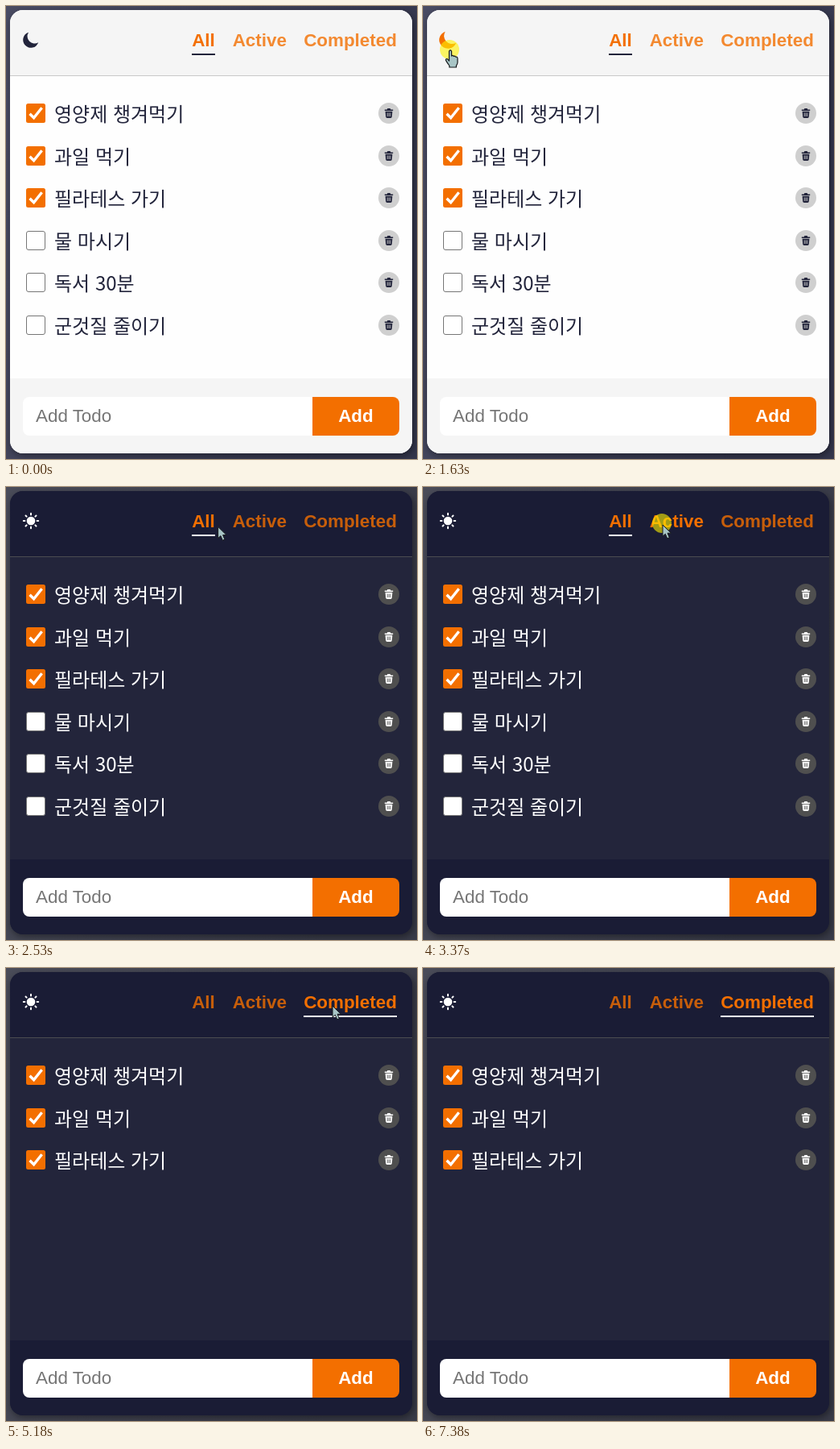
An HTML page for the animation above (7.66 s loop, 511 by 562 pixels).

```html
<!DOCTYPE html>
<html lang="ko">
<head>
<meta charset="utf-8">
<title>Todo</title>
<style>
  html, body { margin: 0; width: 100%; height: 100%; overflow: hidden; }
  svg {
    display: block; width: 511px; height: 562px;
    --page1: #4a4c63; --page2: #34364c; --bar: #f5f5f5; --main: #fefefe;
    --text: #22243b; --line: #c9c9c9; --mark: #22243b; --accent: #f36f00;
  }
  svg.dark {
    --page1: #4a4c59; --page2: #383a47; --bar: #1a1c35; --main: #23253b;
    --text: #fff; --line: #4b4c51; --mark: #fff;
  }
  .bar { fill: var(--bar); }
  .tab, .btn { font: bold 22.4px "Liberation Sans", Arial, sans-serif; }
  .tab { fill: var(--accent); }
  .btn { fill: #fff; }
  .hint { font: 22.4px "Liberation Sans", Arial, sans-serif; fill: #757575; }
  .todo { font: 24px "Noto Sans CJK KR", "Noto Sans CJK", "Noto Sans KR", sans-serif; fill: var(--text); }
  .bin { fill: var(--text); }
</style>
</head>
<body>
<svg id="stage" viewBox="0 0 511 562">
  <defs>
    <linearGradient id="page" x2="1" y2=".35">
      <stop offset="0" style="stop-color:var(--page1)"/>
      <stop offset="1" style="stop-color:var(--page2)"/>
    </linearGradient>
    <filter id="blur" x="-10%" y="-10%" width="120%" height="120%"><feGaussianBlur stdDeviation="4"/></filter>
    <clipPath id="card"><rect x="5" y="5" width="500" height="550" rx="16"/></clipPath>
    <clipPath id="field"><rect x="21" y="485" width="468" height="48" rx="8"/></clipPath>
  </defs>
  <rect width="511" height="562" fill="url(#page)"/>
  <rect x="6" y="8" width="501" height="550" rx="16" opacity=".4" filter="url(#blur)"/>
  <g clip-path="url(#card)">
    <rect x="5" y="5" width="500" height="550" style="fill:var(--main)"/>
    <rect class="bar" x="5" y="5" width="500" height="81"/>
    <rect x="5" y="86" width="500" height="1" style="fill:var(--line)"/>
    <rect class="bar" x="5" y="462" width="500" height="93"/>
  </g>
  <g id="theme">
    <path id="moon" d="M-3-9.3A9.8 9.8 0 1 0 9.2 3.3A9 9 0 0 1-3-9.3Z"/>
    <g id="sun"><circle r="5.3"/></g>
  </g>
  <g id="tabs"></g>
  <rect id="underline" y="59" height="2" style="fill:var(--mark)"/>
  <g id="list"></g>
  <g clip-path="url(#field)">
    <rect x="21" y="485" width="360" height="48" fill="#fff"/>
    <rect x="381" y="485" width="108" height="48" style="fill:var(--accent)"/>
  </g>
  <text class="hint" x="37" y="516">Add Todo</text>
  <text class="btn" x="413.2" y="516">Add</text>
  <g id="cursor">
    <circle id="press" r="12" fill="#fff200" opacity=".6"/>
    <g fill="#a8c5c6" stroke="#17191c" stroke-linejoin="round">
      <path id="arrow" d="M1 2V16.2L4.3 13.2L6.7 18.8L9.3 17.7L7 12.2H11.4Z"/>
      <path id="hand" stroke-width="1.2" d="M-.5 2Q1-.2 2.5 2V8Q4 6.6 5.2 8.4Q6.6 7.4 7.6 9.2Q9.6 8.6 10 11V16Q9.8 18.4 8.4 20V22H-.2V20Q-2.6 17-4.6 13.4Q-5 11.2-2.8 11.6L-.5 14Z"/>
    </g>
  </g>
</svg>
<script>
const LOOP = 7660;
const $ = id => document.getElementById(id);
const make = (parent, tag, attrs, text) => {
  const node = document.createElementNS('http://www.w3.org/2000/svg', tag);
  for (const key in attrs) node.setAttribute(key, attrs[key]);
  if (text) node.textContent = text;
  return parent.appendChild(node);
};
const show = (node, on) => node.setAttribute('display', on ? 'inline' : 'none');

for (let i = 0; i < 8; i++) {
  make($('sun'), 'path', {
    d: 'M0-7.6V-9.2', fill: 'none', 'stroke-width': 2, 'stroke-linecap': 'round', transform: `rotate(${i * 45})`
  });
}

const tabs = [['All', 231.2, 260], ['Active', 281.7, 349], ['Completed', 370.2, 486]]
  .map(([name, x, end]) => ({ x, end, node: make($('tabs'), 'text', { class: 'tab', x, y: 50 }, name) }));

const todos = ['영양제 챙겨먹기', '과일 먹기', '필라테스 가기', '물 마시기', '독서 30분', '군것질 줄이기']
  .map((name, i) => {
    const done = i < 3;
    const node = make($('list'), 'g', {});
    if (done) {
      make(node, 'rect', { x: 25, y: -12, width: 24, height: 24, rx: 2.5, style: 'fill:var(--accent)' });
      make(node, 'path', { d: 'M29.5 .8L34.6 5.8L44.6-6.8', fill: 'none', stroke: '#fff', 'stroke-width': 3.4 });
    } else {
      make(node, 'rect', { x: 25.5, y: -11.5, width: 23, height: 23, rx: 2.5, fill: '#fff', stroke: '#767676' });
    }
    make(node, 'text', { class: 'todo', x: 60, y: 10 }, name);
    const disc = make(node, 'circle', { cx: 476, r: 13 });
    make(node, 'path', {
      class: 'bin',
      d: 'M470.8-4.6H473.6L474.4-6H477.6L478.4-4.6H481.2V-3H470.8ZM471.6-2.2H480.4L479.8 4.6Q479.6 6 478.2 6H473.8Q472.4 6 472.2 4.6Z'
    });
    const slits = make(node, 'path', { d: 'M474.2-.5V4M476-.5V4M477.8-.5V4', 'stroke-width': .8 });
    return { done, node, disc, slits };
  });

const smooth = p => p * p * (3 - 2 * p);
const smoother = p => p * p * p * (p * (6 * p - 15) + 10);
const easeIn = p => p ** 3;
const easeOut = p => 1 - (1 - p) ** 3;

// start, step length, steps, from, to, easing
const moves = [
  [200, 70, 11, [497, 566], [39, 58], smooth],
  [970, 70, 3, [39, 58], [33, 54], easeOut],
  [1900, 70, 8, [33, 54], [181, 53], easeIn],
  [2460, 70, 6, [181, 53], [297, 45], easeOut],
  [4100, 68, 6, [297, 45], [405, 45], smoother],
  [6710, 67, 11, [405, 45], [492, 600], smooth]
];
const clicks = [[1630, 1760], [3370, 3500], [5040, 5180]];

function pointer(t) {
  const move = moves.filter(m => m[0] <= t).pop();
  if (!move) return [-99, 600];
  const [start, step, n, from, to, ease] = move;
  const p = ease(Math.min(n, Math.floor((t - start) / step) + 1) / n);
  return from.map((v, i) => v + (to[i] - v) * p);
}

function draw(t) {
  const dark = t >= 1760;
  const tab = t < 3500 ? 0 : t < 5180 ? 1 : 2;
  const [x, y] = pointer(t);
  const onTheme = x > 15 && x < 38 && y < 58;

  $('stage').setAttribute('class', dark ? 'dark' : '');
  show($('moon'), !dark);
  show($('sun'), dark);
  const tint = onTheme ? 'var(--accent)' : 'var(--text)';
  $('theme').style.fill = $('theme').style.stroke = tint;
  $('moon').style.stroke = 'none';
  $('sun').firstElementChild.style.stroke = 'none';
  $('theme').setAttribute('transform', `translate(31 42) scale(${onTheme ? 1.1 : 1})`);

  tabs.forEach((item, i) => {
    const over = x >= item.x && x <= item.end && y > 30 && y < 62;
    item.node.setAttribute('opacity', i === tab || over ? 1 : .8);
  });
  const left = Math.round(tabs[tab].x);
  $('underline').setAttribute('x', left);
  $('underline').setAttribute('width', tabs[tab].end - left);

  // the bin discs fade between themes in a few steps
  const fade = !dark ? 0 : t < 1840 ? .5 : t < 1910 ? .85 : 1;
  const grey = Math.round(207 - 128 * fade);
  const shade = `rgb(${grey},${grey},${grey})`;
  let row = 0;
  todos.forEach(({ done, node, disc, slits }) => {
    const on = tab === 0 || done === (tab === 2);
    show(node, on);
    if (!on) return;
    node.setAttribute('transform', `translate(0 ${Math.round(133 + 52.6 * row++)})`);
    disc.setAttribute('fill', shade);
    slits.setAttribute('stroke', shade);
  });

  $('cursor').setAttribute('transform', `translate(${x} ${y})`);
  show($('press'), clicks.some(([a, b]) => t >= a && t < b));
  show($('hand'), onTheme);
  show($('arrow'), !onTheme);
}

const begin = performance.now();
function tick() {
  draw((performance.now() - begin) % LOOP);
  requestAnimationFrame(tick);
}
tick();
</script>
</body>
</html>
```
